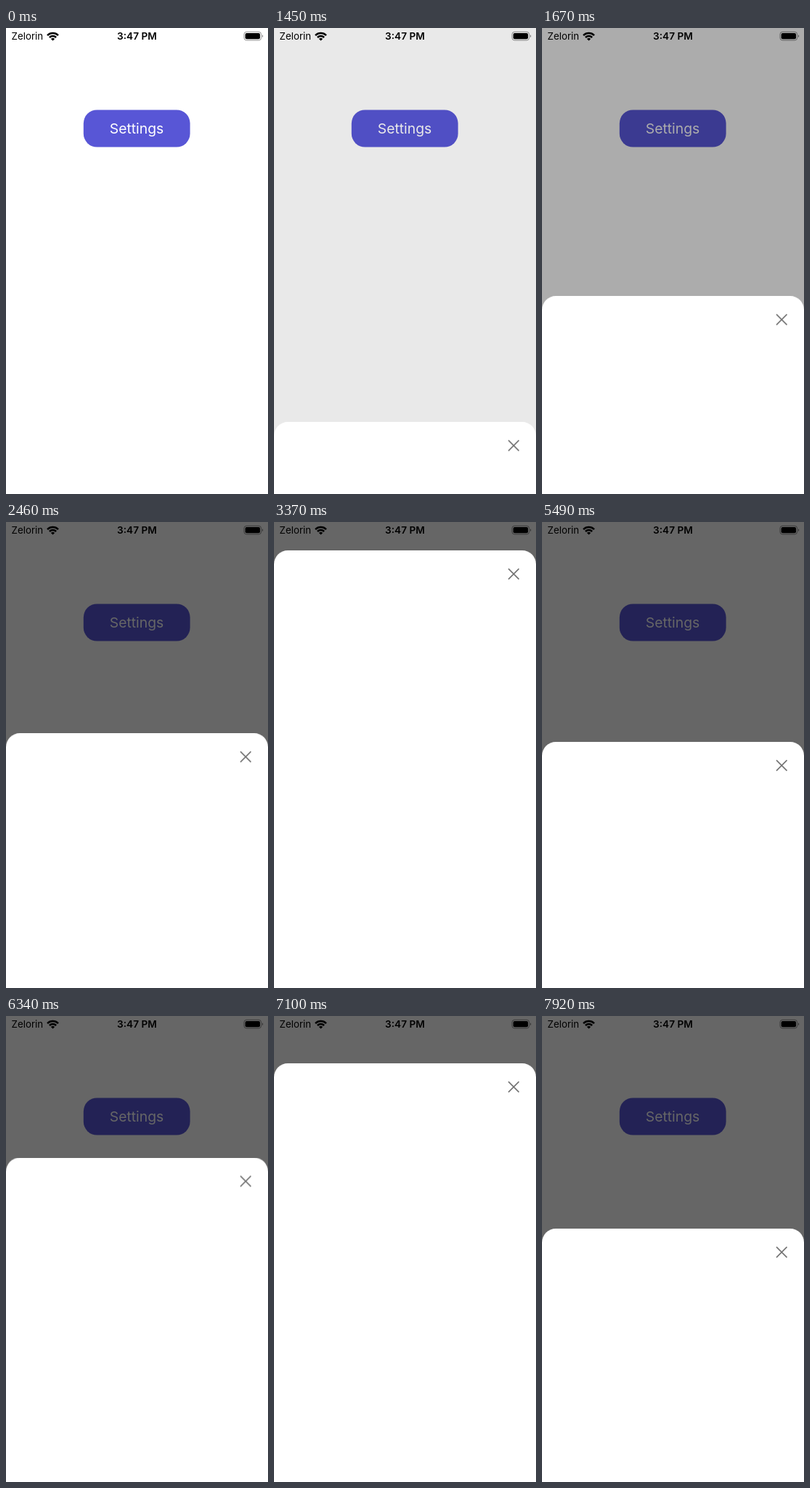
Animation, 361 px wide and 640 px high, one loop 8000 ms. Source, as an HTML page:

```html
<!DOCTYPE html>
<html lang="en">
<head>
<meta charset="utf-8">
<title>Bottom sheet</title>
<style>
  html, body { margin: 0; width: 100%; height: 100%; overflow: hidden; background: #fff; }
  svg { display: block; width: 361px; height: 640px; font-family: Inter, Roboto, sans-serif; }
</style>
</head>
<body>
<svg viewBox="0 0 361 640">
  <rect width="361" height="640" fill="#fff"/>
  <rect x="106.8" y="112.4" width="146.8" height="51.2" rx="18.6" fill="#5856d6"/>
  <text x="180" y="145.4" font-size="19.35" fill="#fff" text-anchor="middle">Settings</text>

  <rect id="dim" width="361" height="640" opacity="0"/>

  <g id="status">
    <text x="7.6" y="16.3" font-size="13.3">Zelorin</text>
    <g fill="none" stroke="#000" stroke-width="2.5">
      <path d="M57 10.1A10.6 10.6 0 0 1 72 10.1"/>
      <path d="M59.9 13A6.5 6.5 0 0 1 69.1 13"/>
    </g>
    <path d="M64.5 17.6L61.9 15A3.7 3.7 0 0 1 67.1 15Z"/>
    <text x="180.4" y="16.3" font-size="13.6" font-weight="600" text-anchor="middle">3:47 PM</text>
    <rect x="328" y="5.3" width="23.6" height="11.6" rx="3.4" fill="none" stroke="#000" stroke-opacity=".42"/>
    <rect x="329.6" y="6.9" width="20.4" height="8.4" rx="2"/>
    <path d="M353 9.2A2.1 2.1 0 0 1 353 13Z" fill-opacity=".5"/>
  </g>

  <g id="sheet" style="transform: translateY(648px)">
    <rect width="361" height="680" rx="19" fill="#fff"/>
    <path d="M323 25.1L337.5 39.6M337.5 25.1L323 39.6" stroke="#747474" stroke-width="1.6" fill="none"/>
  </g>
</svg>
<script>
  const LOOP = 8000, TICK = 110;
  const HIDDEN = 648, HALF = 302, FULL = 39;

  const linear = p => p;
  const easeIn = p => p ** 1.2;
  const easeOut = p => Math.sin(p * Math.PI / 2);
  const glide = p => (1 - Math.cos(p * Math.PI)) / 2;
  const swipe = p => p < .5 ? 2 * p * p : 1 - 2 * (1 - p) ** 2;

  // Each move: start in ms, number of ticks, end value, easing.
  const sheetMoves = [
    [1450, 5, HALF, easeOut],
    // pulled past the limit, then springs back
    [2460, 7, 11, swipe],
    [3260, 1, 48, linear],
    [3370, 1, FULL, linear],
    // down to the middle
    [4500, 4, 297, glide],
    [5160, 4, HALF, linear],
    // up again and slowly down
    [6090, 1, 275, linear],
    [6230, 5, 42, glide],
    [7100, 1, 65, linear],
    [7210, 2, 214, linear],
    [7700, 3, 292, linear]
  ];
  const dimMoves = [[1450, 5, .6, easeIn]];

  function play(id, from, moves, style) {
    const frames = [];
    const add = (time, value) =>
      frames.push({ offset: time / LOOP, easing: 'step-end', ...style(value) });

    add(0, from);
    for (const [start, ticks, to, ease] of moves) {
      for (let i = 1; i <= ticks; i++) {
        add(start + (i - 1) * TICK, from + (to - from) * ease(i / ticks));
      }
      from = to;
    }
    add(LOOP, from);
    document.getElementById(id).animate(frames, { duration: LOOP, iterations: Infinity });
  }

  play('sheet', HIDDEN, sheetMoves, y => ({ transform: `translateY(${y}px)` }));
  play('dim', 0, dimMoves, opacity => ({ opacity }));
</script>
</body>
</html>
```
